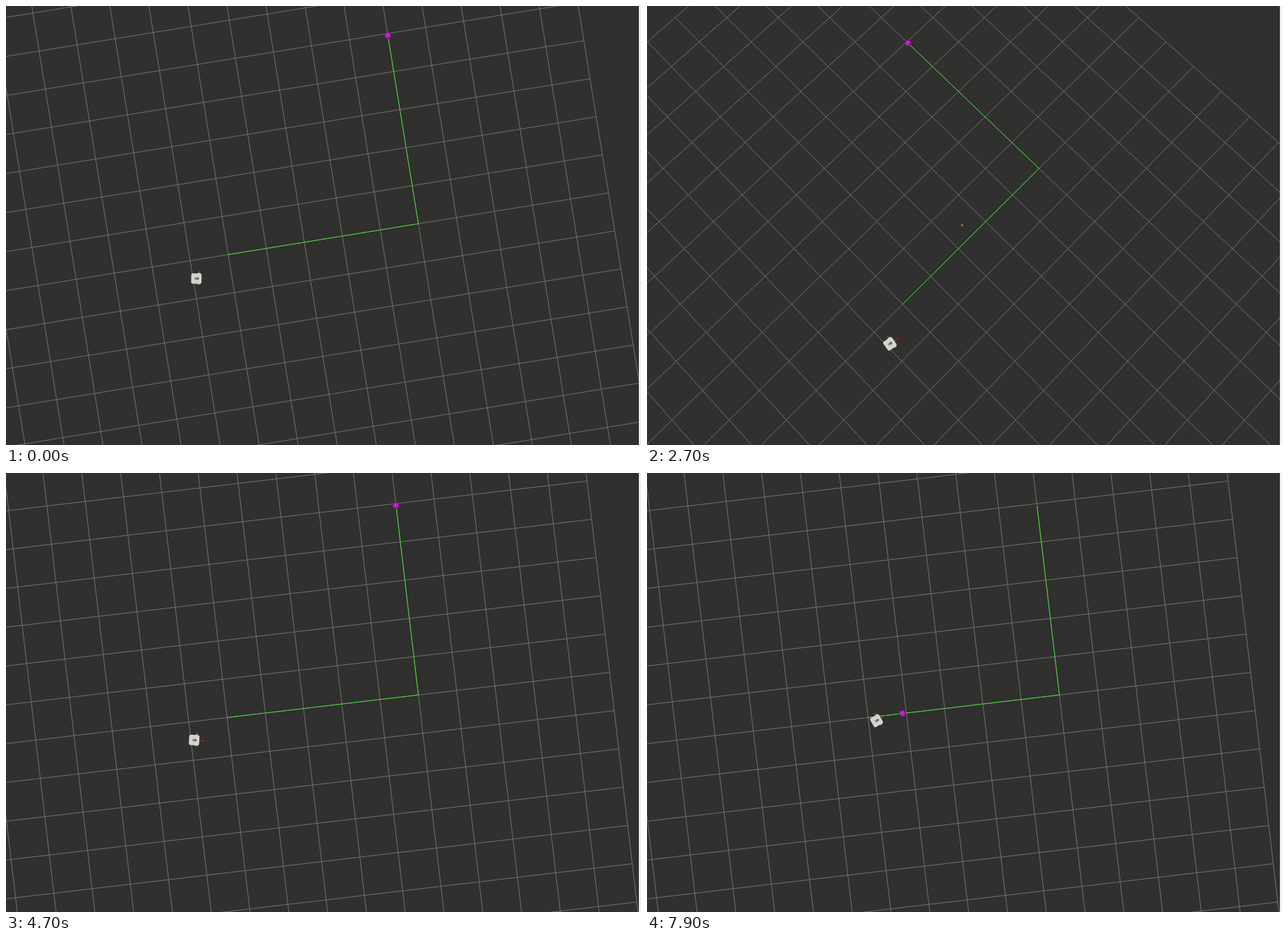
An HTML page with a canvas that plays this animation: 900x622 px, repeating every 8000 ms.

```html
<!DOCTYPE html>
<html lang="en">
<head>
<meta charset="utf-8">
<title>Robot path view</title>
<style>
  html, body { margin: 0; width: 100%; height: 100%; overflow: hidden; background: #30302e; }
  canvas { display: block; }
</style>
</head>
<body>
<canvas id="view" width="900" height="622"></canvas>
<script>
const ctx = document.getElementById('view').getContext('2d');
const LOOP = 8000, STEP = 100;
const CENTER = { x: 446.5, y: 310.6 };
const FOCUS = { x: 2.499, y: 0.367 };  // grid point the camera orbits
const LENS = 750.8, DIST = 13.75;      // focal length in px, distance in cells
const CELL = LENS / DIST;
const HALF = 10;                       // grid reaches from -10 to 10
const SIDE = 5, END = 4.93;            // the two legs of the route
const RAD = Math.PI / 180;

// Progress from 0 to 1 between two times.
const span = (t, from, to) => Math.min(1, Math.max(0, (t - from) / (to - from)));

// Nudged, swung out to 45 degrees, then settling; the view tilts on wide swings.
function camera(t) {
  const yaw = t < 2700
    ? 9.22 + 1.18 * span(t, 1500, 2300) + 34.6 * span(t, 2300, 2700)
    : 6.73 + 38.27 * (1 - span(t, 2700, 3400)) ** 3.92;
  return { yaw, tilt: Math.max(0, (yaw - 17) / 28) * 7.9 };
}

function robot(t) {
  const k = span(t, 4900, 7900);
  return {
    x: -0.917 + 1.125 * k ** 1.25,
    y: -0.481 - 0.314 * k + 0.687 * k * k,
    heading: -10 + 33 * Math.sin(k * Math.PI / 2) ** 1.3
  };
}

const ballAhead = t => 0.9 * span(t, 5800, 7900) ** 1.72;

function makeProjector({ yaw, tilt }) {
  const c = Math.cos(yaw * RAD), s = Math.sin(yaw * RAD);
  const rise = Math.cos(tilt * RAD), away = Math.sin(tilt * RAD);
  return (x, y) => {
    const dx = x - FOCUS.x, dy = y - FOCUS.y;
    const u = dx * c - dy * s, v = dx * s + dy * c;
    const scale = LENS / (DIST + v * away);
    return { x: CENTER.x + u * scale, y: CENTER.y - v * rise * scale, scale };
  };
}

function polyline(points, color, width) {
  ctx.beginPath();
  points.forEach(p => ctx.lineTo(p.x, p.y));
  ctx.strokeStyle = color;
  ctx.lineWidth = width;
  ctx.stroke();
}

function ellipse(x, y, rx, ry, color) {
  ctx.fillStyle = color;
  ctx.beginPath();
  ctx.ellipse(x, y, rx, ry, 0, 0, 7);
  ctx.fill();
}

function drawGrid(project) {
  for (let i = -HALF; i <= HALF; i++) {
    polyline([project(i, -HALF), project(i, HALF)], '#70706f', 1);
    polyline([project(-HALF, i), project(HALF, i)], '#70706f', 1);
  }
}

function drawBall({ x, y, scale }) {
  const r = 5 * scale / CELL;
  const shade = ctx.createRadialGradient(x - 0.5, y - 1, 0.5, x, y, r);
  shade.addColorStop(0, '#c82ccd');
  shade.addColorStop(0.6, '#ac1fb1');
  shade.addColorStop(1, '#5f1262');
  ellipse(x, y, r, r, shade);
}

function drawRobot(p, angle, axis) {
  const k = p.scale / CELL;
  ctx.save();
  ctx.translate(p.x, p.y);
  ctx.rotate(-angle * RAD);
  ctx.scale(k, k);
  polyline([{ x: 7, y: 0 }, { x: 15, y: 0 }], axis, 1.3);
  polyline([{ x: 3.5, y: -6 }, { x: 3.5, y: -11 }], '#27842b', 1.2);
  ctx.fillStyle = '#a9aaa8';
  ctx.fillRect(1.5, -8.2, 4, 16.4);
  ctx.fillStyle = '#d3d3d2';
  ctx.beginPath();
  ctx.roundRect(-7.3, -7.3, 14.6, 14.6, 2.2);
  ctx.fill();
  ellipse(0.3, 0, 3.2, 2, '#92928f');
  ellipse(2, 0, 1.6, 1.1, '#45454f');
  ctx.restore();
}

function draw(t) {
  const view = camera(t), bot = robot(t);
  const project = makeProjector(view);
  ctx.fillStyle = '#30302e';
  ctx.fillRect(0, 0, 900, 622);
  drawGrid(project);
  polyline([project(0, 0), project(SIDE, 0), project(SIDE, END)], '#3bdc31', 1);

  const axis = t < 1200 ? '#69302a' : t < 5000 ? '#b51d20' : '#8c2925';
  drawRobot(project(bot.x, bot.y), bot.heading + view.yaw, axis);
  drawBall(t < 5000 ? project(SIDE, END + 0.02) : project(ballAhead(t), 0));

  if (t >= 1600 && t < 4200) ellipse(446.5, 310.5, 1.5, 1.5, '#8f8f22');
  ctx.fillStyle = '#f0f0ef';
  ctx.fillRect(897, 0, 3, 622);
}

const start = performance.now();
function tick() {
  const t = (performance.now() - start) % LOOP;
  draw(Math.floor(t / STEP) * STEP);
  requestAnimationFrame(tick);
}
tick();
</script>
</body>
</html>
```
